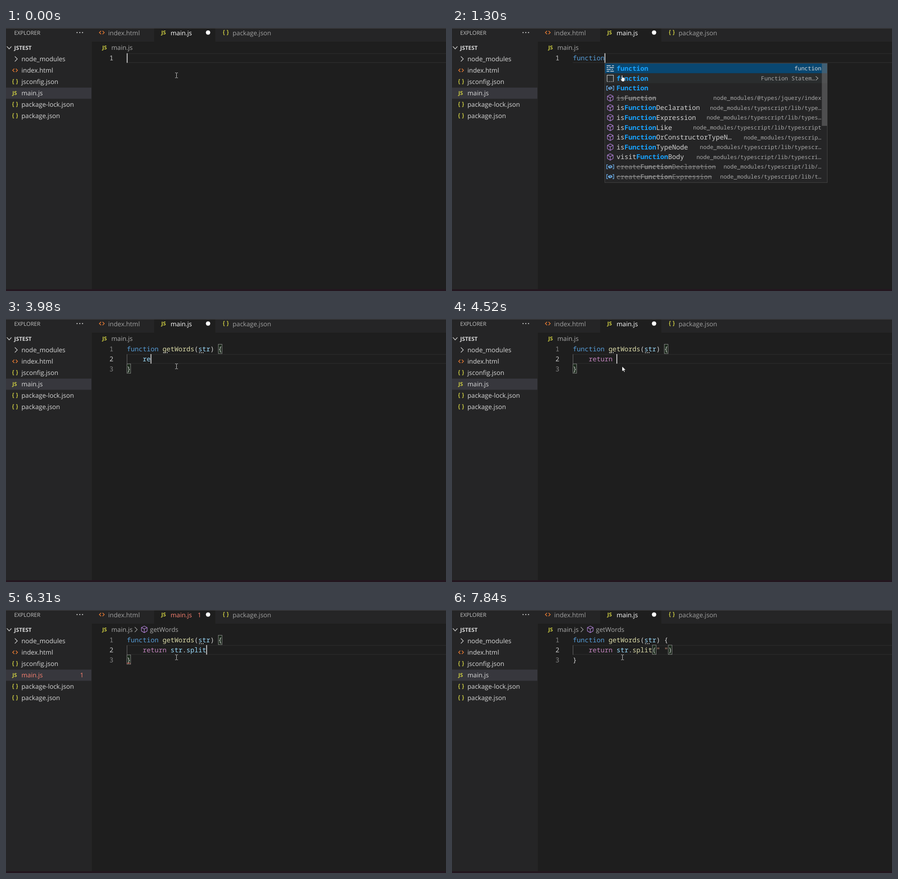
Recreate the animation shown at these times as an HTML page. Size 969 by 578 pixels, loop 8000 ms.

```html
<!DOCTYPE html>
<html lang="en">
<head>
<meta charset="utf-8">
<title>Typing in a code editor</title>
<style>
  html, body { margin: 0; width: 100%; height: 100%; overflow: hidden; background: #1e1e1e; }
  svg { display: block; width: 100%; height: 100%; }
  text { white-space: pre; text-rendering: geometricPrecision; }
  .ui { font: 14.05px "Open Sans", "Noto Sans", sans-serif; }
  .cap { font: 12px "Open Sans", "Noto Sans", sans-serif; }
  .head { font: bold 12.2px "Open Sans", "Noto Sans", sans-serif; }
  .js { font: bold 11.5px "Open Sans", "Noto Sans", sans-serif; }
  .code { font: 500 14.58px "Noto Sans Mono", "DejaVu Sans Mono", monospace; }
  .detail { font: 12.4px "Noto Sans Mono", "DejaVu Sans Mono", monospace; }
</style>
</head>
<body>
<svg id="stage" viewBox="0 0 969 578" preserveAspectRatio="none"><g id="base"></g><g id="live"></g></svg>
<script>
const LOOP = 8000;
const LEFT = 266, TOP = 55.5, CHAR = 8.75, ROW = 21.6;
const YELLOW = '#cbcb41', ORANGE = '#e37933', PURPLE = '#b180d7', RED = '#f88070';
const LIGHT = '#d8d8d8', GREY = '#a0a0a0';

const HEAD = 'function getWords(';
const BODY = HEAD + 'str) {\n    ';

// Suggestion rows: icon | label | detail, or the length of a shortened path. Capital icon: deprecated.
const PATH = 'node_modules/typescript/lib/typescript';
const FUNC = ['k|function|function', 's|function|Function Statem…', 'v|Function|',
  'M|isFunction|node_modules/@types/jquery/index', 'm|isFunctionDeclaration|33',
  'm|isFunctionExpression|34', 'm|isFunctionLike|38', 'm|isFunctionOrConstructorTypeN…|23',
  'm|isFunctionTypeNode|36', 'm|visitFunctionBody|37', 'V|createFunctionDeclaration|29',
  'V|createFunctionExpression|30'];
const RETURN = ['k|return|return', 'm|isReturnStatement|36', 'V|createReturn|38',
  'V|updateReturn|38', 'm|getReturnType|38', 'm|isReturnTypeNode|37', 'm|hasReturnValue|38',
  'm|getReturnTypeNode|36', 'm|visitReturnStatement|34', 'm|isReturnExpression|35',
  'V|createReturnStatement|33', 'V|updateReturnStatement|33'];
const STR = ['v|str|', 'v|String|', 'm|isStringLiteral|38', 'm|isStringLiteralLike|34',
  'm|isStringTextNode|37', 'V|createStringLiteral|34', 'm|isStringName|38',
  'm|getStringValue|38', 'm|structuredClone|38', 'm|isStringKeyword|38',
  'm|hasStringType|38', 'm|getStringFromNode|36'];
const WORDS = ['t|scripts|', 't|start|', 't|src|', 't|test|'];
const MEMBERS = ['t|str|', 't|scripts|', 't|start|', 't|getWords|'];
const HINT = 'hint';

// Each step: start time, text with | as the caret, open panel.
const steps = [
  [0, '|'], [380, 'f|'], [510, 'fu|'], [640, 'fun|'], [770, 'func|', FUNC],
  [930, 'functi|', FUNC], [1050, 'functio|', FUNC], [1300, 'function|', FUNC],
  [1430, 'function |'], [1550, 'function g|'], [1680, 'function get|'],
  [1930, 'function getW|'], [2050, 'function getWo|'], [2200, 'function getWor|'],
  [2320, 'function getWords|'], [2590, HEAD + '|)'], [2740, HEAD + 's|)', WORDS],
  [3000, HEAD + 'str|)', ['t|str|']], [3150, HEAD + 'str|)'], [3280, HEAD + 'str)|'],
  [3580, HEAD + 'str) {|}'], [3700, BODY + '|\n}'], [3980, BODY + 're|\n}'],
  [4120, BODY + 'ret|\n}'], [4250, BODY + 'retu|\n}', RETURN],
  [4390, BODY + 'return|\n}', RETURN], [4520, BODY + 'return |\n}'],
  [4920, BODY + 'return s|\n}', STR], [5050, BODY + 'return st|\n}', STR],
  [5170, BODY + 'return str|\n}', STR], [5430, BODY + 'return str.|\n}'],
  [5810, BODY + 'return str.s|\n}', MEMBERS], [5930, BODY + 'return str.sp|\n}'],
  [6060, BODY + 'return str.spl|\n}'], [6180, BODY + 'return str.spli|\n}'],
  [6310, BODY + 'return str.split|\n}'], [6580, BODY + 'return str.split(|)\n}'],
  [6700, BODY + 'return str.split(|)\n}', HINT], [6950, BODY + 'return str.split("|")\n}', HINT],
  [7200, BODY + 'return str.split(" |")\n}', HINT], [7440, BODY + 'return str.split(" "|)\n}', HINT],
  [7560, BODY + 'return str.split(" ")|\n}']
];

const rect = (x, y, w, h, fill, extra = '') =>
  `<rect x="${x}" y="${y}" width="${w}" height="${h}" fill="${fill}" ${extra}/>`;
const text = (x, y, s, fill, cls = 'ui', extra = '') =>
  `<text x="${x}" y="${y}" fill="${fill}" class="${cls}" ${extra}>${s}</text>`;
const line = (d, stroke, x = 0, y = 0, w = 1.2, extra = '') =>
  `<path d="${d}" transform="translate(${x} ${y})" fill="none" stroke="${stroke}" stroke-width="${w}" ${extra}/>`;
const span = (s, fill, extra = '') => `<tspan fill="${fill}" ${extra}>${s}</tspan>`;
const END = 'text-anchor="end"';
const CHEVRON = 'M-2.5-5.5L3 0l-5.5 5.5';
const CUBE = 'M0-7.2l6.3 3.2v7.6L0 7.2l-6.3-3.6V-4zM-6.3-4L0-.6 6.3-4M0-.6v7.8';

function fileIcon(kind, x, y) {
  if (kind === 'js') return text(x - 6, y + 4, 'JS', YELLOW, 'js');
  if (kind === 'html') return line('M-1.6-3.6L-5.4 0l3.8 3.6M1.6-3.6L5.4 0l-3.8 3.6', ORANGE, x, y, 1.5);
  const brace = 'M-2.5-5h-.8q-1.2 0-1.2 1.2v2.2Q-4.5 0-6 0q1.5 0 1.5 1.6v2.2q0 1.2 1.2 1.2h.8';
  return line(brace, YELLOW, x, y, 1.5) +
    `<g transform="translate(${2 * x} 0) scale(-1 1)">${line(brace, YELLOW, x, y, 1.5)}</g>`;
}

function listIcon(kind, x, y) {
  switch (kind) {
    case 'k': return line('M-8-6H1M4-6h4M-8-2h4M-2-2H8M-8 2h9M3 2h3M-8 6h6M0 6h8', '#e8e8e8', x, y, 1.5);
    case 's': return line('M-7 7V-7H7V7', '#c5c5c5', x, y) +
      line('M-7 7H7', '#c5c5c5', x, y, 1.4, 'stroke-dasharray="2 2"');
    case 'm': return line(CUBE, PURPLE, x, y);
    case 'v': return line('M-5-4.5h-2.8v9H-5M5-4.5h2.8v9H5M-4-1L1-3 4-1 4 1-1 3-4 1zM-4-1L-1 .5 4-1M-1 .5V3', '#75beff', x, y);
    default: return text(x - 9, y + 4, 'abc', '#c5c5c5', 'detail');
  }
}

function drawBase() {
  const files = [['html', 'index.html', 93], ['json', 'jsconfig.json', 118], ['js', '', 143],
    ['json', 'package-lock.json', 168], ['json', 'package.json', 193]];
  return rect(0, 0, 969, 578, '#1e1e1e') + rect(0, 0, 189, 578, '#252526') +
    rect(189, 0, 780, 30, '#252526') + rect(326, 0, 135, 30, '#1e1e1e') +
    rect(0, 131, 188, 24.5, '#37373d') + rect(0, 0, 969, 1, '#454547') +
    rect(0, 574, 969, 4, '#24161f') +
    text(18, 15, 'EXPLORER', '#c4c4c4', 'cap') +
    [156.5, 162.5, 168.5].map(x => `<circle cx="${x}" cy="10" r="1.3" fill="#c5c5c5"/>`).join('') +
    line('M-5-2.5L0 3l5-5.5', LIGHT, 7, 43) + text(18, 47.5, 'JSTEST', LIGHT, 'head') +
    line(CHEVRON, LIGHT, 22, 68) + text(34, 73, 'node_modules', LIGHT) +
    files.map(([k, name, y]) => fileIcon(k, 20, y) + text(34, y + 5, name, LIGHT)).join('') +
    fileIcon('html', 211, 10) + text(225, 16, 'index.html', GREY) +
    fileIcon('js', 348, 10) + `<circle cx="445" cy="10" r="4.8" fill="#fff"/>` +
    fileIcon('json', 484, 10) + text(499, 16, 'package.json', GREY) +
    fileIcon('js', 218, 43) + text(232, 48, 'main.js', '#a9a9a9');
}

function colour(s) {
  return s.replace(/"[^"]*"|\w+/g, (w, i) => {
    if (w[0] === '"') return span(w, '#ce9178');
    if (w === 'function') return span(w, '#569cd6');
    if (w === 'return') return span(w, '#c586c0');
    const called = s.slice(0, i) === 'function ' || s[i + w.length] === '(';
    return span(w, called ? '#dcdcaa' : '#9cdcfe');
  });
}

function drawList(rows, x, y, word) {
  const h = rows.length * ROW + 3, long = rows.length > 11;
  let out = rect(x, y, 490, h, '#252526', 'stroke="#454545"') + rect(x + .5, y + .5, 489, ROW, '#094771');
  if (long && x < 373) out += rect(x + .5, y + ROW + .5, 489, ROW, '#2a2d2e');
  rows.forEach((row, i) => {
    const [icon, label, detail] = row.split('|');
    const old = icon < 'a', cy = y + 11.5 + i * ROW, n = +detail;
    const tail = n ? (n < PATH.length ? PATH.slice(0, n - 1) + '…' : PATH) : detail;
    const name = label.replace(new RegExp(word, 'i'), m => span(m, old ? '#858585' : '#18a3ff', 'font-weight="bold"'));
    out += listIcon(icon.toLowerCase(), x + 12, cy) +
      text(x + 25.8, cy + 5, name, old ? '#858585' : i ? '#d4d4d4' : '#fff', 'code',
        old ? 'text-decoration="line-through"' : '') +
      text(x + (icon === 's' ? 463 : 477), cy + 4.3, tail, i ? '#a8a8a8' : '#d8d8d8', 'detail', END);
    if (icon === 's') out += line('M-2.5-4.5L2.5 0l-5 4.5', '#b0b0b0', x + 467, cy);
  });
  if (long) out += rect(x + 478, y + .5, 11.5, 137, '#797979', 'fill-opacity=".5"');
  return out;
}

function drawHint(x, y) {
  const docs = ['A string that identifies character or characters to use in',
    'separating the string. If omitted, a single-element array',
    'containing the entire string is returned.', '',
    'Split a string into substrings using the specified separator',
    'and return them as an array.'];
  return rect(x, y, 502, 202, '#252526', 'stroke="#454545"') +
    line('M-4 2L0-2l4 4', '#c5c5c5', x + 15, y + 12) + text(x + 4, y + 32, '1/2', '#c5c5c5', 'detail') +
    line('M-4-2L0 2l4-4', '#c5c5c5', x + 15, y + 43) + line('M0 0V202', '#454545', x + 30, y) +
    text(x + 36, y + 20, 'split(' + span('separator: string | RegExp', '#18a3ff') + ', limit?: number):', '#d4d4d4', 'code') +
    text(x + 36, y + 41, 'string[]', '#d4d4d4', 'code') + line('M30 0H502', '#454545', x, y + 53) +
    docs.map((s, i) => text(x + 36, y + 74 + i * 22, s, '#cccccc')).join('');
}

function drawPointer(t, open, x) {
  if (open && open !== HINT && x < 373) {
    return line('M373.2 105q0-1.6 1.3-1.6t1.3 1.6v3.6q3.5-.2 5 1.3v4l-1.5 4h-4.6l-4-5q.3-1.8 2.5-.3z', '#111', 0, 0, 1,
      'style="fill:#fff"');
  }
  const arrow = (t >= 1430 && t < 1680) || (t >= 4520 && t < 4770);
  return arrow
    ? line('M374.5 104v11.6l2.8-2.6 1.9 4 1.8-.8-1.8-4h3.6z', '#111', 0, 0, .8, 'style="fill:#fff"')
    : line('M372.5 98.5h2.2l.8 1 .8-1h2.2M372.5 109.5h2.2l.8-1 .8 1h2.2M375.5 99v10', '#d0d0d0', 0, 0, 1);
}

const dots = (x, y) => [0, 4, 8].map(d => rect(x + d, y, 2, 2, '#b8b8b8')).join('');

function draw(t) {
  const [, marked, open] = steps.findLast(s => s[0] <= t);
  const at = marked.indexOf('|'), src = marked.replace('|', ''), lines = src.split('\n');
  const place = i => {
    const before = src.slice(0, i).split('\n');
    return [LEFT + before.at(-1).length * CHAR, TOP + (before.length - 1) * ROW, before.length - 1];
  };
  const [cx, cy, active] = place(at);
  const error = t >= 5930 && t < 7440;

  let out = text(34, 148, 'main.js', error ? RED : LIGHT) + text(362.5, 16, 'main.js', error ? RED : '#fff');
  if (error) out += text(171, 148, '1', RED, 'ui', END) + text(430, 16, '1', RED, 'ui', END);
  if (t >= 5170) {
    out += line(CHEVRON, GREY, 286, 43) + line(CUBE, PURPLE, 304.5, 42.5) + text(317, 48, 'getWords', '#a9a9a9');
  }

  out += line(`M${LEFT} ${cy + .7}H969M${LEFT} ${cy + 20.5}H969`, '#292929', 0, 0, 1.8);
  if (lines.length > 1) out += line(`M${LEFT + .5} 77.5v21`, '#6a6a6a', 0, 0, 1);

  const start = Math.max(src.lastIndexOf('('), src.lastIndexOf('{'));
  if (start >= 0) {
    const stop = src.indexOf(src[start] === '(' ? ')' : '}', start);
    for (const i of [start, stop]) {
      const [x, y] = place(i);
      out += rect(x + .3, y, CHAR - .5, 20.5, '#1c2a1c', 'stroke="#888"');
    }
  }
  lines.forEach((s, i) => {
    const y = 71.3 + i * ROW;
    out += text(236.5, y, i + 1, i === active ? '#c6c6c6' : '#858585', 'code', END) +
      text(LEFT, y, colour(s), '#d4d4d4', 'code');
  });
  if (t >= 3430) out += dots(425, 73) + (t < 4920 ? dots(346, 73) : '');
  if (error) out += line('M266 118l2-2 2 2 2-2 2 2', '#f14c4c', 0, 0, 1);

  const blink = (t >= 120 && t < 380) || t >= 7840;
  if (!blink) out += rect(cx - .2, cy, 2, 21, '#c8c8c8');

  const px = cx + .5, py = cy + 22;
  if (open === HINT) out += drawHint(px, py);
  else if (open) out += drawList(open, px, py, src.slice(0, at).match(/\w*$/)[0]);
  return out + drawPointer(t, open, px);
}

const live = document.getElementById('live');
document.getElementById('base').innerHTML = drawBase();
let shown = '';
function tick() {
  const next = draw(performance.now() % LOOP);
  if (next !== shown) live.innerHTML = shown = next;
  requestAnimationFrame(tick);
}
tick();
</script>
</body>
</html>
```
